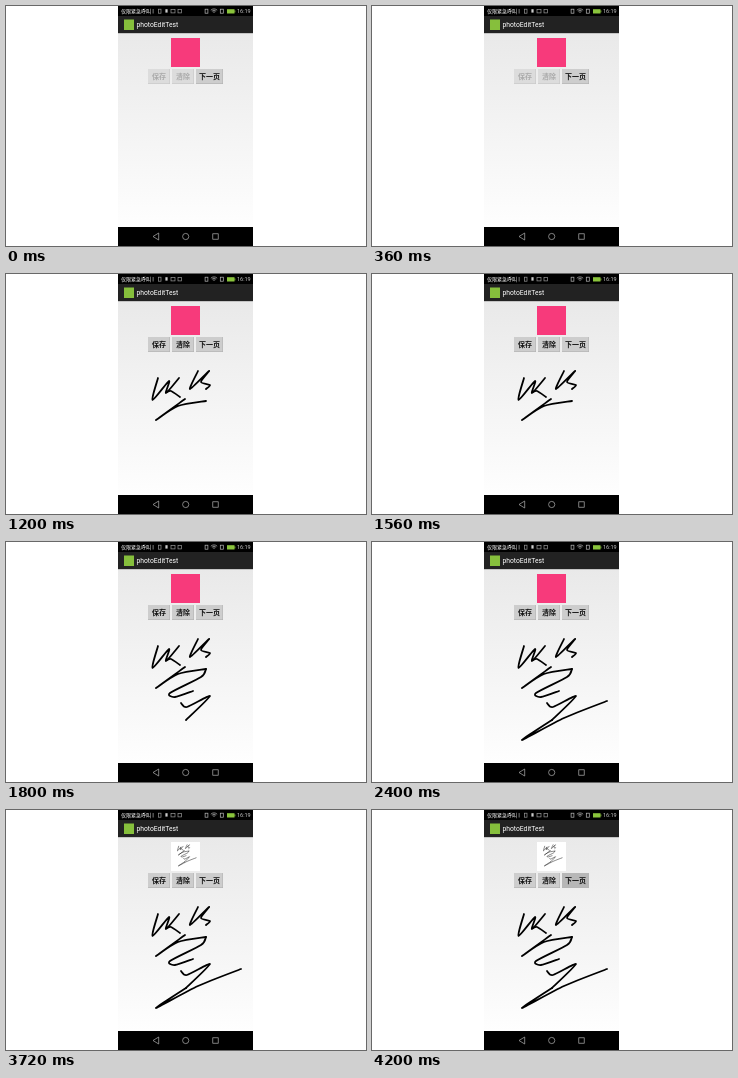
An HTML page with a canvas that plays this animation: 360 px wide and 240 px high, repeating every 4.8 s.

```html
<!DOCTYPE html>
<html lang="zh">
<head>
<meta charset="utf-8">
<style>
html, body { margin: 0; width: 100%; height: 100%; overflow: hidden; background: #fff; }
canvas { display: block; width: 360px; height: 240px; }
</style>
</head>
<body>
<canvas id="stage"></canvas>
<script>
const canvas = document.getElementById('stage');
const ctx = canvas.getContext('2d');
const dpr = window.devicePixelRatio || 1;
canvas.width = 360 * dpr;
canvas.height = 240 * dpr;

const LOOP = 4800, STEP = 600;
const SAVED = 5, PRESSED = 7;
const CJK = '"Noto Sans CJK SC", "Noto Sans CJK", sans-serif';
const LATIN = 'Roboto, sans-serif';

// Key points the pen passes through, and the step each stroke appears in.
const strokes = [
  { from: 1, pts: [[152, 104], [146.5, 126], [163, 107], [160, 119], [173, 104]] },
  { from: 2, pts: [[161, 118], [165, 117], [174, 123]] },
  { from: 2, pts: [[192, 97], [184, 115], [203, 97], [195, 108], [204, 111], [200, 115]] },
  { from: 2, pts: [[179, 125], [150, 146], [172, 132], [200, 127]] },
  { from: 3, pts: [[200, 127], [195, 135], [164, 151], [169, 155], [187, 149]] },
  { from: 3, pts: [[175, 161], [181, 165], [204, 154], [180, 178]] },
  { from: 4, pts: [[180, 178], [150, 198], [192, 176], [235, 159]] }
];

function rect(x, y, w, h, fill) {
  ctx.fillStyle = fill;
  ctx.fillRect(x, y, w, h);
}

function box(x, y, w, h, color) {
  ctx.strokeStyle = color;
  ctx.lineWidth = 0.7;
  ctx.strokeRect(x - w / 2, y - h / 2, w, h);
}

function ring(x, y, r, color, start = 0, end = Math.PI * 2) {
  ctx.beginPath();
  ctx.arc(x, y, r, start, end);
  ctx.strokeStyle = color;
  ctx.lineWidth = 0.7;
  ctx.stroke();
}

function text(str, x, y, size, fill, family, weight = 400) {
  ctx.font = `${weight} ${size}px ${family}`;
  ctx.fillStyle = fill;
  ctx.fillText(str, x, y);
}

function statusBar() {
  rect(112, 0, 135, 10, '#000');
  text('仅限紧急呼叫', 115, 7.2, 5, '#fff', CJK, 500);

  const grey = '#999';
  rect(146.7, 3, 0.8, 4.5, grey);
  box(153.8, 5.2, 2.4, 4, grey);
  rect(159.4, 3.2, 2.2, 3.4, '#ccc');
  box(167, 5.2, 4, 3.4, grey);
  box(173.8, 5.2, 3.6, 3.4, grey);

  box(200.5, 5.2, 2.8, 4, '#bbb');
  for (const r of [1.5, 3, 4.5]) ring(208, 7.4, r, '#bbb', Math.PI * 1.25, Math.PI * 1.75);
  box(215.8, 5.2, 3, 4, '#bbb');
  rect(221, 3.2, 7.5, 4.3, '#8ac43c');
  rect(228.5, 4.4, 0.8, 2, '#8ac43c');
  text('16:19', 231, 7.4, 5.5, '#ccc', LATIN);
}

function titleBar() {
  rect(112, 10, 135, 17, '#222');
  rect(112, 27, 135, 1, '#c4c4c4');
  rect(118, 13.5, 10, 10.5, '#86bf3c');
  text('photoEditTest', 130.5, 21.3, 6.75, '#fff', LATIN);
}

function navBar() {
  rect(112, 221, 135, 19, '#000');
  const grey = '#b4b4b4';
  ctx.beginPath();
  ctx.moveTo(152.7, 227);
  ctx.lineTo(152.7, 234);
  ctx.lineTo(147, 230.5);
  ctx.closePath();
  ctx.strokeStyle = grey;
  ctx.lineWidth = 0.7;
  ctx.stroke();
  ring(179.7, 230.5, 3.1, grey);
  box(209.5, 230.5, 5.4, 5.4, grey);
}

function button(label, x, w, enabled, pressed) {
  rect(x, 63, w, 15, enabled ? '#b4b4b4' : '#c8c8c8');
  rect(x, 63, w - 0.6, 14.3, pressed ? '#b7b7b7' : enabled ? '#cdcdcd' : '#dcdcdc');
  text(label, x + (w - label.length * 7) / 2, 73.3, 7, enabled ? '#111' : '#aaa', CJK, 700);
}

// Cardinal spline through the points; a lower bend gives sharper turns.
function spline(pts, bend = 0.13) {
  const at = i => pts[Math.max(0, Math.min(pts.length - 1, i))];
  const handle = (i, dir) => at(i).map((v, k) => v + dir * bend * (at(i + 1)[k] - at(i - 1)[k]));
  ctx.beginPath();
  ctx.moveTo(...pts[0]);
  for (let i = 1; i < pts.length; i++) {
    ctx.bezierCurveTo(...handle(i - 1, 1), ...handle(i, -1), ...pts[i]);
  }
  ctx.stroke();
}

function ink(step, width) {
  ctx.save();
  ctx.strokeStyle = '#000';
  ctx.lineCap = ctx.lineJoin = 'round';
  ctx.lineWidth = width;
  for (const { from, pts } of strokes) if (step >= from) spline(pts);
  ctx.restore();
}

function preview(step) {
  const saved = step >= SAVED;
  rect(165, 32, 29, 29, saved ? '#fff' : '#f73a7b');
  if (!saved) return;
  ctx.save();
  ctx.translate(164.3, 31);
  ctx.scale(0.21, 0.21);
  ctx.translate(-112, -79);
  ink(step, 2.2);
  ctx.restore();
}

function draw(step) {
  ctx.setTransform(dpr, 0, 0, dpr, 0, 0);
  rect(0, 0, 360, 240, '#fff');
  const paper = ctx.createLinearGradient(0, 27, 0, 221);
  paper.addColorStop(0, '#e9e9e9');
  paper.addColorStop(1, '#fefefe');
  rect(112, 27, 135, 194, paper);
  statusBar();
  titleBar();
  navBar();
  preview(step);
  const drawn = step > 1;
  button('保存', 142, 22, drawn);
  button('清除', 166, 22, drawn);
  button('下一页', 190, 27, true, step === PRESSED);
  ink(step, 1.8);
}

let shown = -1;
function tick() {
  const step = Math.floor(performance.now() % LOOP / STEP);
  if (step !== shown) draw(shown = step);
  requestAnimationFrame(tick);
}
tick();
</script>
</body>
</html>
```
